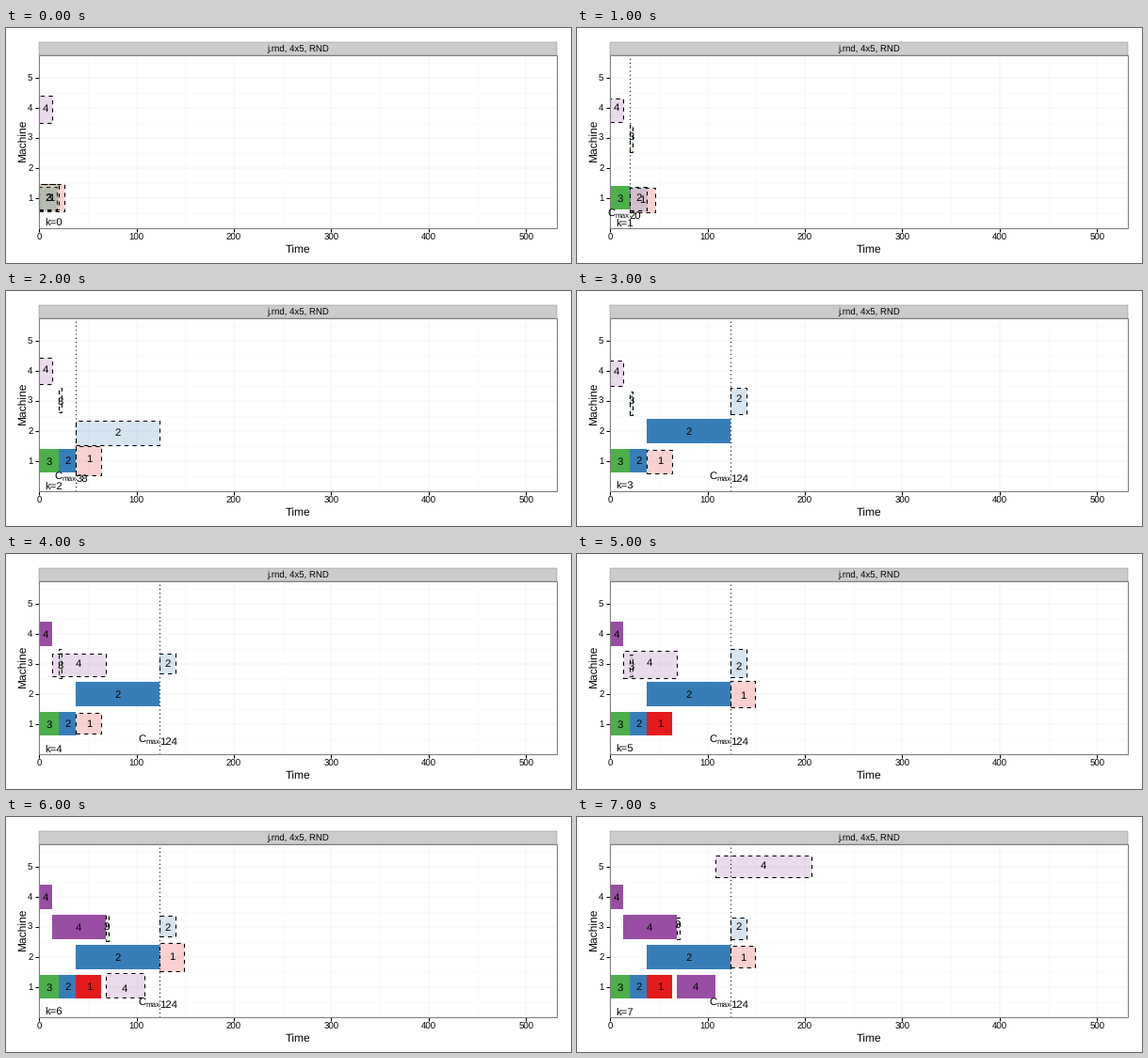
These frames come from a looping animation (600x250 px, 8000 ms). A matplotlib script:

```python
import random

import matplotlib.pyplot as plt
from matplotlib.animation import FuncAnimation
from matplotlib.patches import Rectangle

plt.rcParams.update({
    "font.family": "Liberation Sans",
    "text.hinting": "none",
    "text.kerning_factor": 6,
})

PT = 0.72  # points per pixel at 100 dpi
LINE = 1.07 * PT
THIN = 0.43 * PT
# Kept slightly off pixel centres so that lines snap to the intended pixel.
LEFT, RIGHT, TOP, BOTTOM = 35.2, 585.2, 28.7, 212.7
CENTER = (LEFT + RIGHT) / 2
GREY = "#7f7f7f"
LABEL = 11.38

COLORS = {1: "#e41a1c", 2: "#377eb8", 3: "#4daf4a", 4: "#984ea3"}

# Each job is a list of (machine, duration) operations.
ROUTES = {
    1: [(1, 26), (2, 25)],
    2: [(1, 18), (2, 86), (3, 16)],
    3: [(1, 20), (3, 3)],
    4: [(4, 13), (3, 55), (1, 40), (5, 99)],
}
DISPATCH = [3, 2, 2, 4, 1, 4, 4]

fig = plt.figure(figsize=(6, 2.5), dpi=100, facecolor="white")
ax = fig.add_axes([0, 0, 1, 1])
ax.set_xlim(0, 600)
ax.set_ylim(250, 0)
ax.axis("off")


def px(time):
    return LEFT + 1.034 * time


def py(machine):
    return BOTTOM - 31.9 * machine


def write(x, y, s, size=LABEL, ha="center"):
    """Text whose digits are centred vertically on y."""
    return ax.text(x, y + 0.32 * size, s, fontsize=size * PT, ha=ha,
                   va="baseline", color="black")


def segment(xs, ys, color="black", width=LINE, **kw):
    return ax.plot(xs, ys, color=color, lw=width, solid_capstyle="butt",
                   dash_capstyle="butt", **kw)[0]


def draw_grid(times, machines, color, width):
    for t in times:
        segment([px(t)] * 2, [TOP, BOTTOM], color, width, zorder=0.5)
    for m in machines:
        segment([LEFT, RIGHT], [py(m)] * 2, color, width, zorder=0.5)


def draw_axes():
    draw_grid(range(50, 532, 100), [m + 0.5 for m in range(6)],
              "#fafafa", LINE)
    draw_grid(range(0, 501, 100), range(1, 6), "#e5e5e5", THIN)
    for t in range(0, 501, 100):
        segment([px(t)] * 2, [BOTTOM, BOTTOM + 4.25])
        write(px(t), 222.9, str(t), 9.6)
    for m in range(1, 6):
        segment([LEFT - 4.25, LEFT], [py(m)] * 2)
        write(28.4, py(m) - 0.3, str(m), 9.6, ha="right")
    ax.add_patch(Rectangle((LEFT, TOP), RIGHT - LEFT, BOTTOM - TOP,
                           fill=False, ec=GREY, lw=LINE, zorder=2.5))
    ax.add_patch(Rectangle((LEFT, TOP - 14), RIGHT - LEFT, 14,
                           fc="#cccccc", ec=GREY, lw=THIN, zorder=2.4))
    write(CENTER, 21.7, "j.rnd, 4x5, RND", 9.6)
    write(CENTER, 235, "Time", 12)
    ax.text(23.5, 120.5, "Machine", fontsize=12 * PT, rotation=90,
            ha="right", va="center")


def schedule(step):
    """Placed and pending operations as (job, machine, start, end)."""
    job_free = dict.fromkeys(ROUTES, 0)
    machine_free = dict.fromkeys(range(1, 6), 0)
    done = dict.fromkeys(ROUTES, 0)

    def next_op(job):
        if done[job] == len(ROUTES[job]):
            return None
        machine, duration = ROUTES[job][done[job]]
        start = max(job_free[job], machine_free[machine])
        return job, machine, start, start + duration

    placed = []
    for job in DISPATCH[:step]:
        op = next_op(job)
        placed.append(op)
        job_free[job] = machine_free[op[1]] = op[3]
        done[job] += 1
    pending = [op for op in map(next_op, ROUTES) if op]
    return placed, pending


def draw_op(op, up=12.7, down=12.7, shift=0, **style):
    job, machine, start, end = op
    y = py(machine)
    box = Rectangle((px(start), y + down), px(end) - px(start), -up - down,
                    **style)
    ax.add_patch(box)
    return [box, write(px((start + end) / 2), y + shift, str(job))]


def draw_makespan(value):
    x = px(value)
    panel = Rectangle((LEFT, TOP), RIGHT - LEFT, BOTTOM - TOP,
                      transform=ax.transData)
    texts = [
        write(x - 23.3, 196, "C", ha="left"),
        write(x - 15.1, 199.8, "max", LABEL * 0.7, ha="left"),
        write(x, 199.5, str(value), ha="left"),
    ]
    for text in texts:
        text.set_clip_path(panel)
    return texts + [segment([x, x], [BOTTOM, TOP], ls=(0, (1, 3)))]


artists = []


def update(step):
    while artists:
        artists.pop().remove()
    placed, pending = schedule(step)
    for op in placed:
        artists.extend(draw_op(op, fc=COLORS[op[0]], lw=0))
    # Candidates get jittered edges and labels.
    rng = random.Random(step)
    for op in pending:
        up, down = rng.uniform(10, 16), rng.uniform(10, 16)
        artists.extend(draw_op(op, up, down, rng.uniform(-2.5, 2.5),
                               fc=(COLORS[op[0]], 0.2), ec="black",
                               lw=LINE, ls=(0, (4, 4))))
    if placed:
        artists.extend(draw_makespan(max(op[3] for op in placed)))
    artists.append(write(41.2, 207.5, f"k={step}", ha="left"))
    return artists


draw_axes()
anim = FuncAnimation(fig, update, frames=8, interval=1000, repeat=True,
                     repeat_delay=0, init_func=lambda: update(0), blit=False)
plt.show()
```
